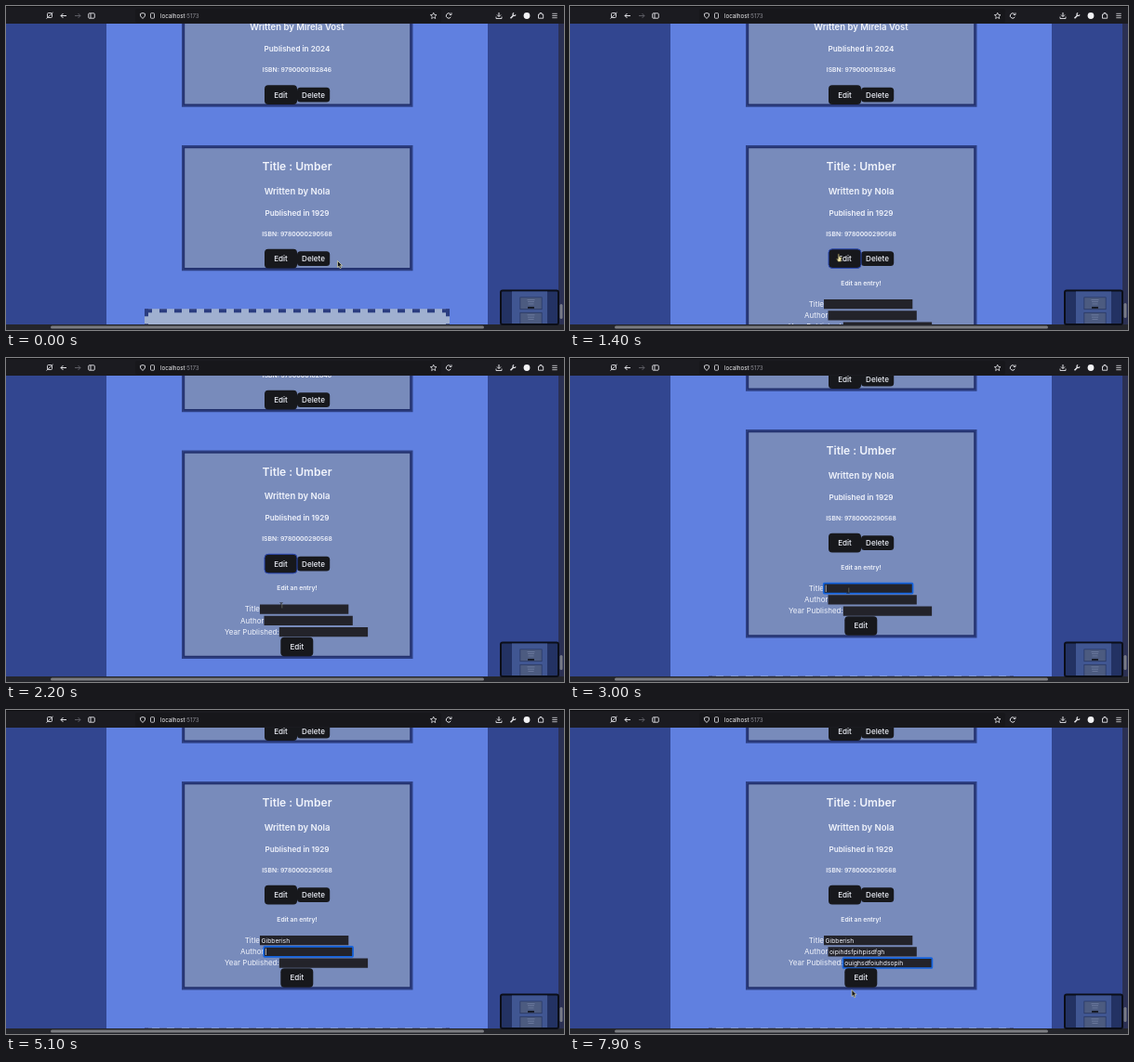
Animation of 600 by 349 pixels, one loop 8000 ms. Source, as an HTML page with a canvas:

```html
<!DOCTYPE html>
<html lang="en">
<head>
<meta charset="utf-8">
<title>Book list editor</title>
<style>
  html, body { margin: 0; width: 100%; height: 100%; overflow: hidden; background: #324690; }
  canvas { display: block; width: 600px; height: 349px; }
</style>
</head>
<body>
<canvas id="stage"></canvas>
<script>
const W = 600, H = 349, LOOP = 8000, STEP = 100;
const canvas = document.getElementById('stage');
const ctx = canvas.getContext('2d');
const dpr = window.devicePixelRatio || 1;
canvas.width = W * dpr;
canvas.height = H * dpr;

const FONT = 'Inter, Roboto, sans-serif';
const INK = '#f1f4fc', BAR = '#1b1b20', ICON = '#e4e4e8';
const OPENED = 1300;

const scrollTrack = [[1800, 0], [1900, 9], [2200, 50.5], [2300, 65], [2400, 73]];
const mouseTrack = [
  [300, 356.5, 274.5], [700, 354, 274.5], [1100, 289, 270], [1600, 289, 270],
  [2000, 296, 267], [2400, 296, 267], [2700, 299, 250], [7500, 299, 250], [7800, 303, 301.5]
];
const fields = [
  { label: 'Title', x: 273, y: 316, text: 'Gibberish', focus: 2800, blur: 4800, from: 3400, rate: 110 },
  { label: 'Author', x: 277.5, y: 328.2, text: 'oipihdsfpihpisdfgh', focus: 4800, blur: 6100, from: 5150, rate: 48 },
  { label: 'Year Published:', x: 293.8, y: 340.4, text: 'ouighsdfoiuhdsopih', focus: 6100, blur: LOOP, from: 6200, rate: 60 }
];
const books = [
  { top: -26.5, title: 'Title : Lanterns', author: 'Mirela Vost', year: 2024, isbn: '9790000182846' },
  { top: 150, title: 'Title : Umber', author: 'Nola', year: 1929, isbn: '9780000290568' }
];

function at(track, t) {
  if (t <= track[0][0]) return track[0].slice(1);
  for (let i = 1; i < track.length; i++) {
    const a = track[i - 1], b = track[i];
    if (t <= b[0]) {
      const k = (t - a[0]) / (b[0] - a[0]);
      return a.slice(1).map((v, j) => v + (b[j + 1] - v) * k);
    }
  }
  return track[track.length - 1].slice(1);
}

function box(x, y, w, h, color, r = 0) {
  ctx.fillStyle = color;
  ctx.beginPath();
  ctx.roundRect(x, y, w, h, r);
  ctx.fill();
}

function text(s, x, y, size, weight = 400, align = 'center', color = INK) {
  ctx.font = `${weight} ${size}px ${FONT}`;
  ctx.textAlign = align;
  ctx.textBaseline = 'alphabetic';
  ctx.fillStyle = color;
  ctx.fillText(s, x, y + size * 0.36);
}

function line(points, color = ICON, width = 1, close = false) {
  ctx.beginPath();
  points.forEach(([x, y]) => ctx.lineTo(x, y));
  if (close) ctx.closePath();
  ctx.strokeStyle = color;
  ctx.lineWidth = width;
  ctx.stroke();
}

function ring(x, y, w, h, color, width, r) {
  ctx.beginPath();
  ctx.roundRect(x, y, w, h, r);
  ctx.strokeStyle = color;
  ctx.lineWidth = width;
  ctx.stroke();
}

function arc(x, y, r, from, to, color = ICON, width = 1) {
  ctx.beginPath();
  ctx.arc(x, y, r, from, to);
  ctx.strokeStyle = color;
  ctx.lineWidth = width;
  ctx.stroke();
}

function bigButton(x, y) {
  box(x, y, 35, 20.6, '#17181c', 4);
  text('Edit', x + 17.5, y + 10.3, 8.1, 500);
}

function card(book, height) {
  const y = book.top;
  box(189, y, 248.5, height, '#2e4084');
  box(190.7, y + 1.7, 245.1, height - 3.4, '#22306c');
  box(192.2, y + 3.2, 242, height - 6.4, '#788bbb');
  text(book.title, 313, y + 23, 12.1, 600);
  text('Written by ' + book.author, 313, y + 49.2, 9.5, 600);
  text('Published in ' + book.year, 313, y + 73, 8.15, 600);
  text('ISBN: ' + book.isbn, 313, y + 95.4, 6.75, 600);
  bigButton(278, y + 111.8);
  box(313, y + 114.3, 35.2, 15.6, '#17181c', 3.5);
  text('Delete', 330.5, y + 122.2, 8.1, 500);
}

function field(f, t) {
  const n = Math.max(0, Math.min(f.text.length, Math.floor((t - f.from) / f.rate) + 1));
  const typed = f.text.slice(0, n);
  const active = t >= f.focus && t < f.blur;
  text(f.label, f.x, f.y + 5, 8, 400, 'right');
  box(f.x, f.y, 95.3, 10.3, '#23232a');
  if (active) ring(f.x - 0.3, f.y - 0.3, 95.9, 10.9, '#1463dd', 1.7, 1);
  text(typed, f.x + 1.5, f.y + 5.2, 6.75, 400, 'left');
  if (!active) return;
  const lastKey = n ? f.from + (n - 1) * f.rate : f.focus;
  if ((t - lastKey) % 1000 < 500) {
    box(f.x + 1.8 + ctx.measureText(typed).width, f.y + 1.5, 0.7, 7.4, '#e8e8ee');
  }
}

function form(t) {
  text('Edit an entry!', 313, 298.3, 6.75, 600);
  fields.forEach(f => field(f, t));
  bigButton(295.3, 351.2);
}

function addPanel(y) {
  box(149, y, 328, 90, '#a0b0d0');
  for (let x = 149; x < 477; x += 16) box(x, y, 8, 4, '#2b3d80');
  for (let dy = 0; dy < 90; dy += 16) {
    box(149, y + dy, 4, 8, '#2b3d80');
    box(473, y + dy, 4, 8, '#2b3d80');
  }
}

function page(t) {
  const open = t >= OPENED;
  box(0, 0, W, H, '#324690');
  box(108, 0, 410, H, '#6080e0');
  ctx.save();
  ctx.translate(0, -at(scrollTrack, t)[0]);
  card(books[0], 135.3);
  card(books[1], open ? 224.4 : 135.3);
  if (open) {
    if (t < fields[0].focus) ring(278, 261.8, 35, 20.6, '#2a48b4', 1, 4);
    form(t);
  }
  addPanel(open ? 415.6 : 326.3);
  ctx.restore();
}

function preview() {
  box(531, 305.5, 64, 38.5, '#0b0e18', 3);
  box(533, 307.5, 60, 34.5, '#233263', 1);
  box(544, 307.5, 38, 34.5, '#405692');
  for (const y of [313.5, 330]) {
    box(552.5, y, 24, y < 320 ? 13.5 : 12, '#26345f');
    box(553.2, y + 0.7, 22.6, y < 320 ? 12.1 : 11.3, '#4c5b80');
    for (let i = 0; i < 3; i++) box(560.5 + i * 0.5, y + 2.5 + i * 2.3, 8 - i, 0.7, '#7583a5');
  }
  box(561, 324, 7, 1.8, '#11141d', 0.5);
}

function scrollbars(t) {
  box(594, 19, 6, 330, '#2b3053');
  box(595.5, 321 + (t >= OPENED ? -1 : 0), 3, 16, '#777a86', 1.5);
  box(0, 343, W, 6, '#24252b');
  box(48, 344.5, 466, 3, '#7b7c80', 1.5);
}

function toolbar() {
  box(0, 0, W, 19, BAR);
  box(0, 0, W, 1, '#0c0c0f');
  box(139, 3, 329, 15, '#17171b', 2.5);

  ring(44.5, 7.5, 5, 5, ICON, 0.9, 1);
  line([[43.5, 13.5], [50.5, 7]], ICON, 0.9);
  line([[65, 10.5], [59, 10.5]]);
  line([[61.5, 8], [59, 10.5], [61.5, 13]]);
  line([[74, 10.5], [80, 10.5]], '#5c5c63');
  line([[77.5, 8], [80, 10.5], [77.5, 13]], '#5c5c63');
  ring(88.7, 7.8, 6.6, 5.4, ICON, 0.9, 1);
  line([[91, 8], [91, 13]], ICON, 0.9);

  line([[147, 7.5], [149.6, 8.4], [149.3, 11], [147, 13.5], [144.7, 11], [144.4, 8.4]], ICON, 0.9, true);
  ring(155.5, 7.7, 4, 5.5, ICON, 0.8, 0.8);
  text('localhost', 166, 10.6, 6.2, 400, 'left', '#f4f4f6');
  const w = ctx.measureText('localhost').width;
  text(':5173', 166 + w, 10.6, 6.2, 400, 'left', '#8e8e96');

  const star = [];
  for (let i = 0; i < 10; i++) {
    const a = -Math.PI / 2 + i * Math.PI / 5, r = i % 2 ? 1.6 : 3.5;
    star.push([459.7 + r * Math.cos(a), 10.7 + r * Math.sin(a)]);
  }
  line(star, ICON, 0.8, true);
  arc(476, 10.5, 2.7, 0.5, 5.6);
  line([[479, 7.3], [479, 9.5], [476.9, 9.5]], ICON, 0.9);

  line([[530, 7], [530, 11.3]]);
  line([[528, 9.5], [530, 11.5], [532, 9.5]]);
  line([[527, 11.5], [527, 13.5], [533, 13.5], [533, 11.5]], ICON, 0.9);
  line([[542.5, 13.3], [546, 9.7]], ICON, 1.5);
  arc(546.5, 9, 1.5, 0.2, 4.5, ICON, 1.2);
  ctx.beginPath();
  ctx.arc(560, 10.5, 3.4, 0, Math.PI * 2);
  ctx.fillStyle = '#f2f2f4';
  ctx.fill();
  line([[572.5, 9], [574, 9], [574, 7.5], [576, 7.5], [576, 9], [577.7, 9], [577.7, 13.2], [572.5, 13.2]], ICON, 0.9, true);
  for (const y of [8.3, 10.5, 12.7]) line([[587.3, y], [592.7, y]], ICON, 0.8);
}

function shape(points, fill, edge) {
  ctx.beginPath();
  points.forEach(([x, y]) => ctx.lineTo(x, y));
  ctx.closePath();
  ctx.fillStyle = fill;
  ctx.fill();
  ctx.strokeStyle = edge;
  ctx.lineWidth = 0.7;
  ctx.stroke();
}

function pointer(t) {
  if (t >= fields[0].from && t < 7500) return;
  const [x, y] = at(mouseTrack, t);
  ctx.save();
  ctx.translate(x, y);
  if (t >= 1900 && t < 7600) {
    line([[-1.5, -3.5], [0, -3], [1.5, -3.5]], '#202126', 0.8);
    line([[0, -3], [0, 3]], '#202126', 0.9);
    line([[-1.5, 3.5], [0, 3], [1.5, 3.5]], '#202126', 0.8);
    line([[0.8, -2.5], [0.8, 2.5]], '#b9bda0', 0.4);
  } else if (t >= 1000 && t < 1900) {
    shape([[-0.8, -3], [0.4, -3], [0.5, 0], [3, 0.6], [2.8, 4], [2, 5.5], [-0.7, 5.5], [-2.7, 2], [-0.8, 2.5]], '#e9dfa4', '#3b3823');
  } else {
    shape([[0, 0], [0, 7], [1.6, 5.7], [2.7, 8.2], [4, 7.6], [2.9, 5.2], [5, 5]], '#15161b', '#d9d7ae');
  }
  ctx.restore();
}

function draw(now) {
  const t = Math.floor((now % LOOP) / STEP) * STEP;
  ctx.setTransform(dpr, 0, 0, dpr, 0, 0);
  page(t);
  scrollbars(t);
  preview();
  toolbar();
  pointer(t);
}

const start = performance.now();
function tick() {
  draw(performance.now() - start);
  requestAnimationFrame(tick);
}
tick();
</script>
</body>
</html>
```
